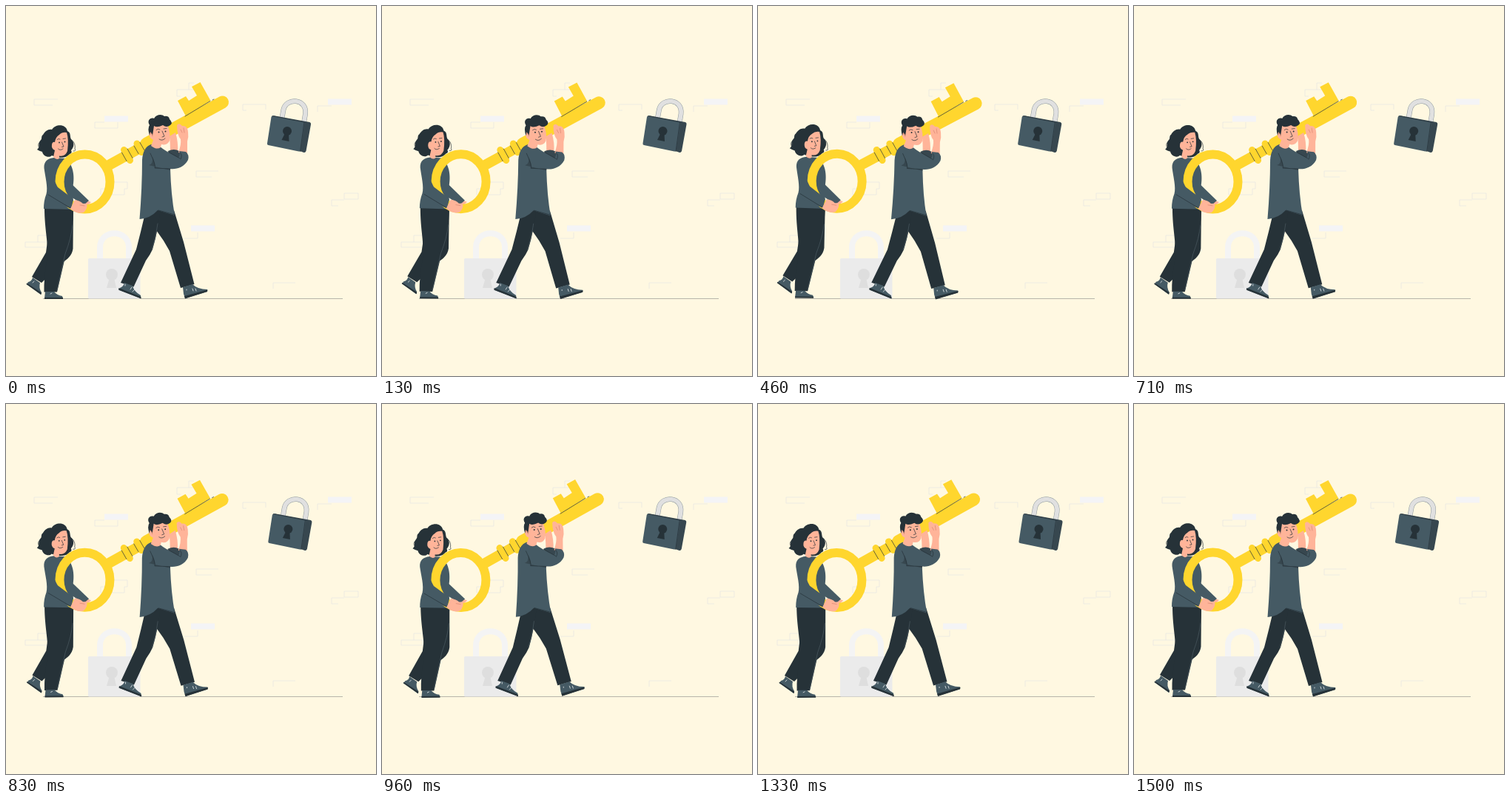
An HTML page for the animation above (1540 ms loop, 500 by 500 pixels).

```html
<!DOCTYPE html>
<html lang="en">
<head>
<meta charset="utf-8">
<title>Key and padlock</title>
<style>
  html, body { margin: 0; width: 100%; height: 100%; overflow: hidden; background: #fff8e1; }
  svg { display: block; width: 100%; height: 100%; }
  .slate { fill: #455a64; }
  .dark { fill: #263238; }
  .shade { fill: #37474f; }
  .skin { fill: #ffb499; }
  .gold { fill: #ffd62e; }
  .bar { fill: none; stroke: #ffd62e; stroke-linecap: round; }
  .line { fill: none; stroke: #263238; stroke-width: .7; stroke-linecap: round; }
  .seam { stroke: #4b5a61; }
  .blush { stroke: #d98772; }
  .lace { fill: none; stroke: #eceff1; stroke-width: .8; stroke-linecap: round; }
</style>
</head>
<body>
<svg viewBox="0 0 500 500">
  <!-- Wall -->
  <path fill="none" stroke="#e6e6e3" stroke-width=".7" d="M70 126H38V134H63M120 165V157H133M120 165H151V157M231 122V113H256M231 122H236
    M247 113V104H254M351 133H320V141H325M351 133V140M421 143V135H440M287 223H257V231H278M440 270V262H457M440 270H449
    M457 253H476V261H457ZM241 314H259V306M361 382V374H391M26 326V319H43M26 326H57M58 310H43V319H57
    M128 255V247H145M128 255H160V247M145 247V238H164V247H160"/>
  <path fill="#f4f4f6" d="M133 148.500H165V156.500H133ZM435 125.500H467V133.500H435ZM250 296.500H282V304.500H250Z"/>
  <path stroke="#a5a59c" stroke-width=".8" d="M50 395.500H455"/>
  <path fill="none" stroke="#f4f4f4" stroke-width="8" d="M127 341V326C127 301 166 301 166 326V341"/>
  <rect x="111" y="341" width="70.500" height="54.500" rx="1.500" fill="#ebebeb"/>
  <path fill="#dedede" d="M140 367L136 381H149L146 367Z"/>
  <circle cx="143" cy="363" r="8" fill="#dedede"/>

  <g id="lock">
    <path fill="none" stroke="#8c979b" stroke-width="6.800" d="M373 151L375 140C378.500 123 407.500 125 404.500 146L402.500 158"/>
    <path fill="none" stroke="#e0e0e0" stroke-width="5.800" d="M373 151L375 140C378.500 123 407.500 125 404.500 146L402.500 158"/>
    <path class="shade" d="M361 148L410.500 157Q412.500 158 412 160L405.500 196Q404.500 198.500 402.500 198L397 196Z"/>
    <path class="slate" d="M361 148.500L402 156.500Q404 157 403.500 159L398 195Q397.500 197 395.500 196.500L354.500 188Q352.500 187.500 353 185.500L358.500 150Q359 148 361 148.500Z"/>
    <path class="line" d="M360 148.500L403 157L397.500 196.500"/>
    <path class="dark" d="M377.500 171L372.500 181L382.500 183L382 172Z"/>
    <circle class="dark" cx="380" cy="169" r="6"/>
  </g>

  <g id="carriers">
    <!-- Woman -->
    <path class="dark" d="M42 194C47 190 42 187 47 181C49 180 47 176 50 174C53 169 57 166 62 167C67 159 81 159 83 169C88 171 86 176 88 180C93 184 92 191 88 195Q90 199 86 200C80 208 67 204 62 202C58 206 50 203 49 197Q45 196 42 194Z"/>
    <path class="line" d="M84 180C92 180 94 188 93 193Q95 196 91 196M50 181Q42 184 44 190"/>
    <path class="dark" d="M62 274H91L90.500 328C89 338 83 342 76 347L48 374L35 366L54 333Z"/>
    <path class="slate" d="M36 367L46 374Q44 381 48 387L47 390L28 376L30 373Q35 372 36 367Z"/>
    <path class="dark" d="M28 374.500L48 387.500L47.500 390L27.500 376Z"/>
    <path class="dark" d="M52 273H91Q91 305 81 335L69 386.500H51.500Q51 368 55.500 342C58 322 52 303 52 273Z"/>
    <path class="line seam" d="M90 296Q88 314 80 335L69 384"/>
    <path class="slate" d="M53 386H65Q69 391 76 392L77 395H52Z"/>
    <path class="dark" d="M52 394H77V396H52Z"/>
    <path class="lace" d="M36 374L38 372M60 389L62 388"/>
    <path class="skin" d="M104 261L115 265L110 270L102 268Z"/>
    <path class="slate" d="M86 238L112 263L105 269L85 256Z"/>
    <path class="slate" d="M65 205C56 206 51 210 51.500 219C53 231 57 245 54.500 254Q51 263 51 274L91 275Q91 260 90 247C93 232 92 216 81 206Z"/>
    <path class="skin" d="M82 171Q85 180 83 196Q80 204 72 202.500L72 206Q68 209 64 204L66 195Q61 193 62 187Q63 183 66 184Q67 177 72 174Q76 170 82 171Z"/>
    <path class="line" d="M69 180.500Q71 178.500 73 180M77 179.500L80.500 179M75.500 184L78 190L75.500 190.500M70.500 193Q73 196 77 193"/>
    <g class="dark"><circle cx="72" cy="184.500" r=".9"/><circle cx="79.500" cy="183.500" r=".9"/></g>

    <!-- Key -->
    <ellipse class="bar" cx="106.500" cy="237.500" rx="34" ry="37" stroke-width="12"/>
    <path class="bar" stroke-width="14" d="M140 214.500L200 181.500"/>
    <path class="bar" stroke-width="17" d="M190 186L292.500 130"/>
    <path class="gold" d="M232 128L243 122L247 128L258 121L251 109L262.500 103L276.500 128L243 149Z"/>
    <path class="bar" stroke-width="9" d="M159.500 194.500L167.500 208.500M177 186L183 197.500"/>
    <path class="line" d="M156.500 198L163 209.500M164 193L171 205.500M173 189L179 199.500M181 184.500L187 195M242 149L276 128.500M279 127L281 126"/>

    <!-- Sleeve and hand gripping the ring -->
    <path class="slate" d="M58 226C64 230 67 240 70 245L86 257L91 262L88 274L57 261Z"/>
    <path class="line" d="M87 273L57 255"/>
    <path class="skin" d="M93 262Q100 263 104 267L109 267Q111 273 105 279Q96 282 87 274Z"/>
    <path class="line blush" d="M100 269L106 270"/>

    <!-- Man -->
    <path class="dark" d="M196 272L227 276L240 319L254.500 376L236 381L221 331Q213 316 203 303Z"/>
    <path class="dark" d="M188 280L209 272Q206 302 198 329Q195 336 189 344L172.500 379.500L155 374L176 329Q182 306 188 280Z"/>
    <path class="line seam" d="M205 294Q202 315 197 329"/>
    <path class="slate" d="M160 374L171 378Q173 386 182 391V395L153 384L154 381Q159 379 160 374Z"/>
    <path class="dark" d="M152.500 381L182.500 393V395.500L152 383.500Z"/>
    <path class="slate" d="M239 380L252 376Q259 383 272 383V386L242 395L240 389Z"/>
    <path class="dark" d="M241 392L272.500 383.500L272 386L242 395.500Z"/>
    <path class="lace" d="M168 383L170 380M171 386L174 383M253 385L252 382M257 385L256 382M161 378L161 376M244 384L244 383"/>
    <path class="skin" d="M221 176L229 171Q233 184 232 197H222Q222 186 221 176Z"/>
    <path class="shade" d="M219 196Q227 192 234 196L240 207L222 204Z"/>
    <path class="skin" d="M231 161Q234 157 238 162Q245 161 246 170Q247 177 245 183V200L233 198Q237 187 236 180Q231 174 231 161Z"/>
    <path class="slate" d="M196 187Q185 191 184 208Q184 245 180.500 288Q195 287 205 276L228 283Q223 255 222 220C230 221 241 218 246 208Q248 201 243 197L234 196Q236 201 233 205Q215 196 208 190Z"/>
    <path class="shade" d="M198 204Q203 215 201 219L222 220V222L193 215Q199 214 198 204Z"/>
    <path class="line" d="M195 199Q203 216 201 219L222 220M219 197L235 206M235 198Q239 201 236 207M206 276L228 282"/>
    <path class="skin" d="M194 170Q199 157 218 160Q223 172 221 182Q218 189 210 187L209 191Q204 195 196 189L199 181Q192 178 194 170Z"/>
    <path class="dark" d="M194 175Q191 165 194 161C190 155 195 150 200 152C203 146 211 146 214 149Q220 148 221 153Q226 158 222 161Q217 165 212 161Q204 165 200 162L198 175L195 170Z"/>
    <path class="line" d="M203 167.500Q205 165 208 167M213 166L217 165.500M211 169L214 176L211 177M207 180Q211 183 215 179"/>
    <g class="dark"><circle cx="206.500" cy="170.500" r="1"/><circle cx="215.500" cy="169.500" r="1"/></g>
    <path class="line blush" d="M195 172Q198 171 198 176M236 167L238 171M240 165L241 171"/>
  </g>
</svg>
<script>
  const LOOP = 1540, CYCLE = 1500;
  const lock = document.getElementById('lock');
  const carriers = document.getElementById('carriers');
  const shakeStops = [0, -.5, 1, -2, 2, -2, 2, -2, 1, -.5, 0];
  const swayStops = [0, 1, 0, -1, 0];
  const linear = x => x;

  // cubic-bezier(.25, .1, .25, 1)
  function ease(x) {
    let lo = 0, hi = 1, s = .5;
    for (let i = 0; i < 20; i++) {
      if (.75 * s * (1 - s) + s ** 3 < x) lo = s; else hi = s;
      s = (lo + hi) / 2;
    }
    return .3 * s * (1 - s) ** 2 + 3 * s * s * (1 - s) + s ** 3;
  }

  function sample(stops, p, timing) {
    const pos = p * (stops.length - 1);
    const i = Math.min(Math.floor(pos), stops.length - 2);
    return stops[i] + (stops[i + 1] - stops[i]) * timing(pos - i);
  }

  function draw() {
    const p = Math.min(performance.now() % LOOP / CYCLE, 1);
    lock.setAttribute('transform', `translate(${sample(shakeStops, p, ease)})`);
    carriers.setAttribute('transform', `rotate(${sample(swayStops, p, linear)} 164 249.5)`);
    requestAnimationFrame(draw);
  }
  draw();
</script>
</body>
</html>
```
